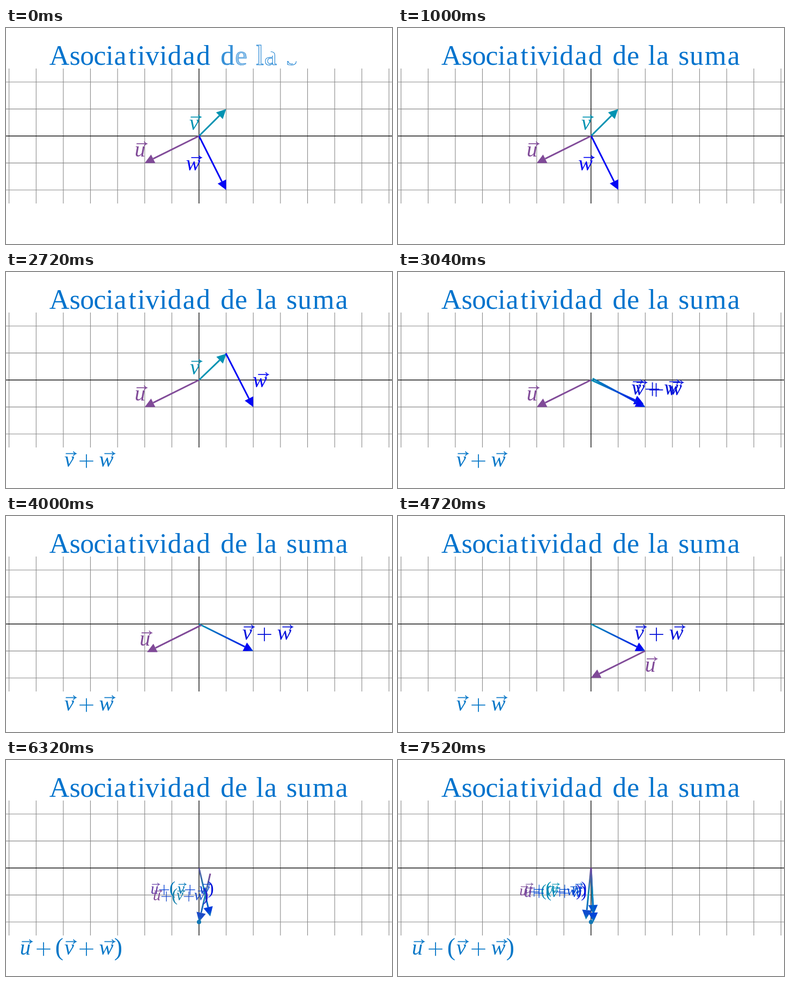
These frames come from a looping animation (720 by 405 pixels, 7.56 s). An HTML page with a canvas:

```html
<!DOCTYPE html>
<html lang="es">
<head>
<meta charset="utf-8">
<title>Asociatividad de la suma</title>
<style>
html, body { margin: 0; width: 100%; height: 100%; overflow: hidden; background: #fff; }
canvas { display: block; width: 720px; height: 405px; }
</style>
</head>
<body>
<canvas id="stage" width="720" height="405"></canvas>
<script>
const LOOP = 7560, STEP = 40, UNIT = 50.625, EM = 40;
const ctx = document.getElementById('stage').getContext('2d');

const BLUE = [1, 115, 205], TEAL = [0, 147, 178], PURPLE = [128, 74, 152];
const NAVY = [3, 6, 245], SUM = [6, 18, 218], MID = [2, 76, 212];

const clamp = x => Math.max(0, Math.min(1, x));
const sigmoid = x => 1 / (1 + Math.exp(-x));
const EDGE = sigmoid(-5);
const smooth = x => clamp((sigmoid(10 * x - 5) - EDGE) / (1 - 2 * EDGE));
const span = (t, a, b) => clamp((t - a) / (b - a));
const ease = (t, a, b) => smooth(span(t, a, b));
const mix = (a, b, p) => Array.isArray(a) ? a.map((v, i) => mix(v, b[i], p)) : a + (b - a) * p;
const rgb = c => `rgb(${c.map(Math.round).join()})`;
const at = (x, y) => [360 + x * UNIT, 202.5 - y * UNIT];

function line(x1, y1, x2, y2, style, width) {
  ctx.strokeStyle = style;
  ctx.lineWidth = width;
  ctx.beginPath();
  ctx.moveTo(x1, y1);
  ctx.lineTo(x2, y2);
  ctx.stroke();
}

function grid() {
  for (let i = -7; i <= 7; i++) {
    const [x] = at(i, 0);
    if (i) line(x, 76, x, 329, '#888', 1.1);
  }
  for (const j of [-2, -1, 1, 2]) {
    const [, y] = at(0, j);
    line(0, y, 720, y, '#888', 1.1);
  }
  line(0, 202.5, 720, 202.5, '#111', 1.3);
  line(360, 76, 360, 329, '#111', 1.4);
}

// An arrow is [tail, head, three colours along the shaft].
const arrow = (tail, head, ...c) => [at(...tail), at(...head), c.length > 1 ? c : [c[0], c[0], c[0]]];

function drawArrow([[x1, y1], [x2, y2], c]) {
  const len = Math.hypot(x2 - x1, y2 - y1);
  const dx = (x2 - x1) / len, dy = (y2 - y1) / len;
  const tip = Math.min(0.35 * UNIT, len / 4), half = tip / 2;
  const bx = x2 - dx * tip, by = y2 - dy * tip;
  const shaft = ctx.createLinearGradient(x1, y1, x2, y2);
  c.forEach((v, i) => shaft.addColorStop(i / 2, rgb(v)));
  line(x1, y1, bx, by, shaft, 3);
  const fill = ctx.createLinearGradient(bx, by, x2, y2);
  fill.addColorStop(0.4, rgb(c[2]));
  fill.addColorStop(1, rgb(c[1]));
  ctx.fillStyle = fill;
  ctx.beginPath();
  ctx.moveTo(x2, y2);
  ctx.lineTo(bx - dy * half, by + dx * half);
  ctx.lineTo(bx + dy * half, by - dx * half);
  ctx.fill();
}

// Draws one glyph; w runs 0..0.5 for the outline and 0.5..1 for the fill.
function glyph(ch, x, y, size, style, color, w = 1) {
  if (w <= 0) return;
  const alpha = ctx.globalAlpha, outline = clamp(2 * w), fill = clamp(2 * w - 1);
  ctx.font = `${style} ${size}px "Liberation Serif", serif`;
  ctx.textAlign = 'center';
  if (w < 1) {
    const loop = 2.2 * size;
    ctx.setLineDash(outline < 1 ? [loop * outline, 9 * loop] : []);
    ctx.strokeStyle = rgb(color);
    ctx.lineWidth = Math.max(0.05, 1 - fill);
    ctx.strokeText(ch, x, y);
    ctx.setLineDash([]);
  }
  ctx.globalAlpha = alpha * fill;
  ctx.fillStyle = rgb(color);
  ctx.fillText(ch, x, y);
  ctx.globalAlpha = alpha;
}

function plus(x, y, k, color, w) {
  const r = 12.8 * k * clamp(2 * w), m = y - 10 * k;
  line(x - r, m, x + r, m, rgb(color), 1.8 * k);
  line(x, m - r, x, m + r, rgb(color), 1.8 * k);
}

function accent(x, y, k, color, w) {
  const end = x + 9.5 * k, back = 5 * k, h = 4 * k;
  line(x - 9.5 * k, y, x - 9.5 * k + 19 * k * clamp(2 * w), y, rgb(color), 1.7 * k);
  if (w < 0.5) return;
  ctx.lineWidth = 1.5 * k;
  ctx.beginPath();
  ctx.moveTo(end - back, y - h);
  ctx.quadraticCurveTo(end - 3 * k, y - k, end, y);
  ctx.quadraticCurveTo(end - 3 * k, y + k, end - back, y + h);
  ctx.stroke();
}

// A piece is [character, [x, baseline, scale, colour]].
function drawPiece([ch, [x, y, k, color]], w = 1) {
  if (w <= 0) return;
  if (ch === '+') plus(x, y, k, color, w);
  else if ('()'.includes(ch)) glyph(ch, x, y + k, 46 * k, '', color, w);
  else {
    glyph(ch, x, y, EM * k, 'italic', color, w);
    accent(x + (ch === 'w' ? 6 : 3) * k, y - 24 * k, k, color, w);
  }
}

const LAYOUT = [['u', 36], ['+', 70], ['(', 99.5], ['v', 118], ['+', 150], ['w', 187], [')', 209.5]];

function formula(from, to, cx, y, k, ...colors) {
  const part = LAYOUT.slice(from, to);
  const mid = (part[0][1] + part[part.length - 1][1]) / 2;
  return part.map(([ch, x], i) => [ch, [cx + (x - mid) * k, y, k, colors[i % colors.length]]]);
}

const draw = pieces => pieces.forEach(p => drawPiece(p));

function slide(a, b, p) {
  draw(a.map(([ch, v], i) => [ch, mix(v, b[i][1], p)]));
}

// Pieces of both formulas travel together while one set fades into the other.
function morph(a, b, p) {
  const show = clamp(2 * p - 0.5);
  const pass = (own, other, q, alpha) => {
    ctx.globalAlpha = alpha;
    own.forEach(([ch, v], i) => {
      const mate = other[Math.floor(i * other.length / own.length)];
      drawPiece([ch, mix(v, mate[1], q)]);
    });
    ctx.globalAlpha = 1;
  };
  if (show < 1) pass(a, b, p, 1 - show);
  if (show > 0) pass(b, a, 1 - p, show);
}

// Staggered pen progress of item i out of n.
const pen = (p, i, n) => {
  const lag = Math.min(4 / (n + 1), 0.2);
  return clamp(p * ((n - 1) * lag + 1) - i * lag);
};

const TITLE = 'Asociatividad de la suma', TITLE_EM = 50.7;
const ADVANCE = { A: .75, s: .394, o: .5, c: .444, i: .278, a: .5, t: .389, v: .528,
  d: .556, e: .444, l: .278, u: .556, m: .833, ' ': .333 };

function title(t) {
  const p = 0.703 + 0.297 * t / 355, n = TITLE.replace(/ /g, '').length;
  let x = 80.5, i = 0;
  for (const ch of TITLE) {
    const adv = ADVANCE[ch] * TITLE_EM;
    if (ch !== ' ') glyph(ch, x + adv / 2, 69, 52, '', BLUE, pen(Math.min(1, p), i++, n));
    x += adv;
  }
}

const u0 = arrow([0, 0], [-2, -1], PURPLE), u1 = arrow([2, -1], [0, -2], PURPLE);
const v0 = arrow([0, 0], [1, 1], TEAL);
const w0 = arrow([0, 0], [1, -2], NAVY), w1 = arrow([1, 1], [2, -1], NAVY);
const sum = arrow([0, 0], [2, -1], TEAL, MID, NAVY);
const total = arrow([0, 0], [0, -2], PURPLE, TEAL, MID);

const uLabel = formula(0, 1, 250, 241, 1, PURPLE), uMoved = formula(0, 1, 471, 292, 1, PURPLE);
const vLabel = formula(3, 4, 351, 191, 1, TEAL);
const wLabel = formula(5, 6, 349, 267, 1, NAVY), wMoved = formula(5, 6, 474, 216, 1, NAVY);
const sumLabel = formula(3, 6, 484.5, 232, 1, SUM);
const totalLabel = formula(0, 7, 289, 255.6, 0.66, PURPLE, MID, TEAL, TEAL, MID, MID, SUM);
const result = formula(0, 7, 122.75, 364.5, 1, [8, 120, 200]);

function vectors(t) {
  if (t < 5840) {
    const p = ease(t, 3810, 4750), q = ease(t, 950, 1770), r = ease(t, 2670, 3150);
    if (r < 1) {
      drawArrow(mix(v0, sum, r));
      drawArrow(mix(mix(w0, w1, q), sum, r));
    } else drawArrow(sum);
    drawArrow(mix(u0, u1, p));
    slide(uLabel, uMoved, p);
    if (r > 0) {
      morph(vLabel, sumLabel, r);
      if (r < 1) morph(wMoved, sumLabel, r);
    } else {
      draw(vLabel);
      slide(wLabel, wMoved, q);
    }
  } else if (t < 7400) {
    const p = ease(t, 5840, 6600);
    drawArrow(mix(sum, total, p));
    drawArrow(mix(u1, total, p));
    if (p < 1) {
      morph(sumLabel, totalLabel, p);
      morph(uMoved, totalLabel, p);
    } else draw(totalLabel);
  } else {
    const p = ease(t, 7400, 7830);
    for (const a of [u0, v0, w0]) drawArrow(mix(total, a, p));
    for (const l of [uLabel, vLabel, wLabel]) morph(totalLabel, l, p);
  }
}

function equation(t) {
  const inner = span(t, 2050, 2450), outer = span(t, 4890, 5650);
  [3, 4, 5].forEach((k, i) => drawPiece(result[k], pen(inner, i, 3)));
  [0, 1, 2, 6].forEach((k, i) => drawPiece(result[k], pen(outer, i, 4)));
}

function dot(t) {
  const [x, y] = at(0, -2);
  ctx.globalAlpha = ease(t, 4900, 5660);
  ctx.fillStyle = '#1278b4';
  ctx.beginPath();
  ctx.arc(x, y, 4.05, 0, 2 * Math.PI);
  ctx.fill();
  ctx.globalAlpha = 1;
}

function render(now) {
  const t = Math.floor((now % LOOP) / STEP) * STEP;
  ctx.fillStyle = '#fff';
  ctx.fillRect(0, 0, 720, 405);
  grid();
  title(t);
  vectors(t);
  equation(t);
  dot(t);
}

function tick(now) {
  render(now);
  requestAnimationFrame(tick);
}
render(performance.now());
requestAnimationFrame(tick);
</script>
</body>
</html>
```
